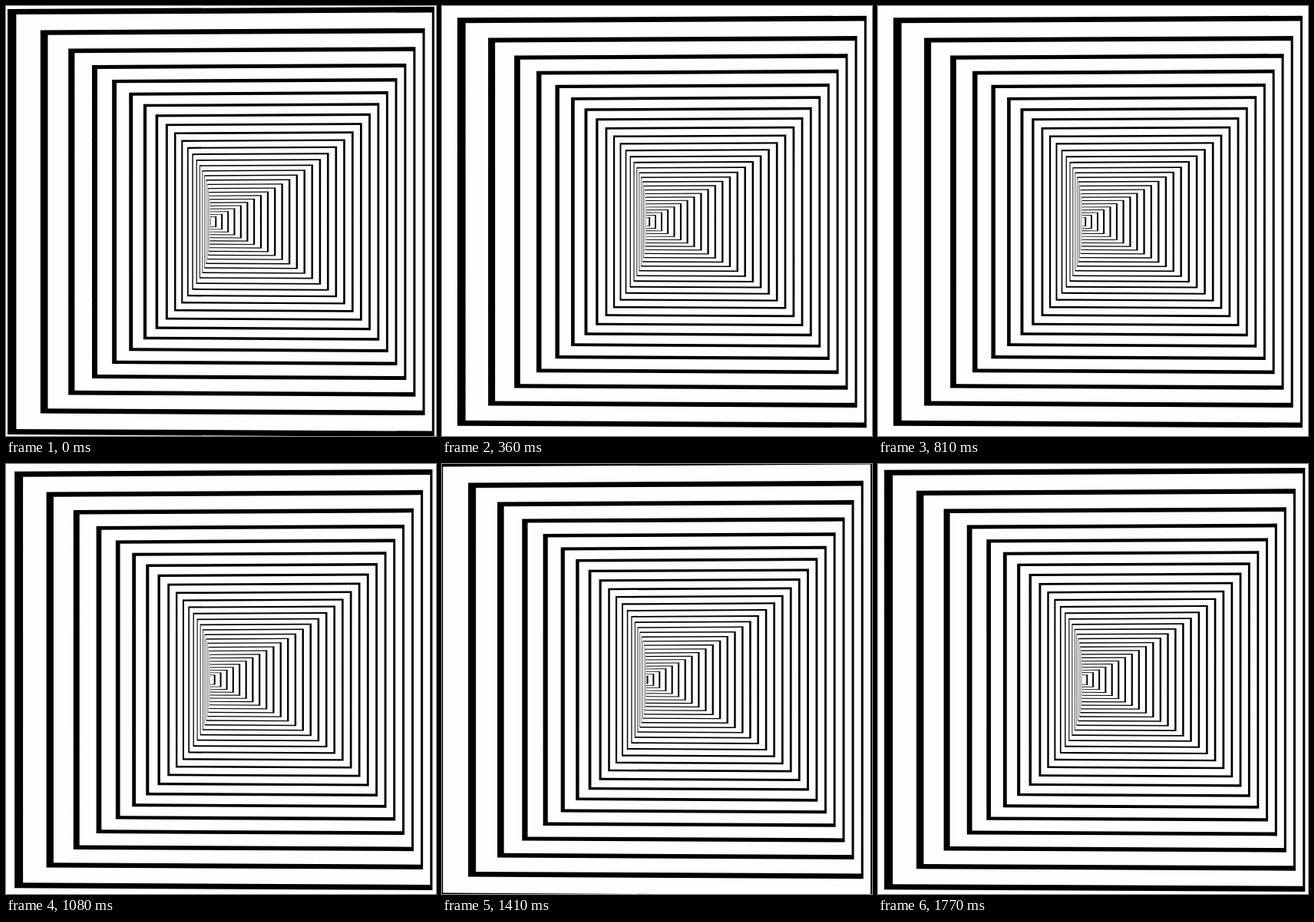
An HTML page that plays this animation: 560x560 px, repeating every 1.8 s.

```html
<!DOCTYPE html>
<html lang="en">
<head>
<meta charset="utf-8">
<title>Square tunnel</title>
<style>
  html, body { margin: 0; width: 100%; height: 100%; overflow: hidden; background: #fefefe; }
  svg { display: block; width: 560px; height: 560px; }
</style>
</head>
<body>
<svg viewBox="0 0 560 560"><path id="rings" fill="#000" fill-rule="evenodd"/></svg>
<script>
const FRAME = 30;      // ms per drawn step
const SPACING = 225;   // ms for a ring to reach the place of the next one
const LOOP = 1800;
const RINGS = 30;
const BAND = 0.25;     // black share of the ring spacing
const CENTER_Y = 281;
const path = document.getElementById('rings');

// Outline of the tunnel at depth u: 0 is the far end, 29 fills the stage.
function quad(u) {
  const x4 = (u / 29) ** 4;
  const left = 266 - 264 * (0.725 * x4 + 0.275 * x4 * x4);
  const right = 266.5 + 7.67 * u + 0.082 * u * u;
  const half = (right - left) / 2 + 4 * Math.exp(-u / 3);
  const hl = half * 0.997, hr = half * 1.007;
  const points = [
    [left, CENTER_Y - hl], [right, CENTER_Y - hr],
    [right, CENTER_Y + hr], [left, CENTER_Y + hl]
  ];
  return 'M' + points.map(p => p.map(v => v.toFixed(2)).join(' ')).join('L') + 'Z';
}

function render(ms) {
  const time = Math.floor((ms % LOOP) / FRAME) * FRAME;
  const shift = (time / SPACING) % 1;
  let d = '';
  for (let i = 0; i < RINGS; i++) {
    const u = i + shift;
    d += quad(u);
    if (u > BAND) d += quad(u - BAND);
  }
  path.setAttribute('d', d);
}

const start = performance.now();
function tick() {
  render(performance.now() - start);
  requestAnimationFrame(tick);
}
tick();
</script>
</body>
</html>
```
